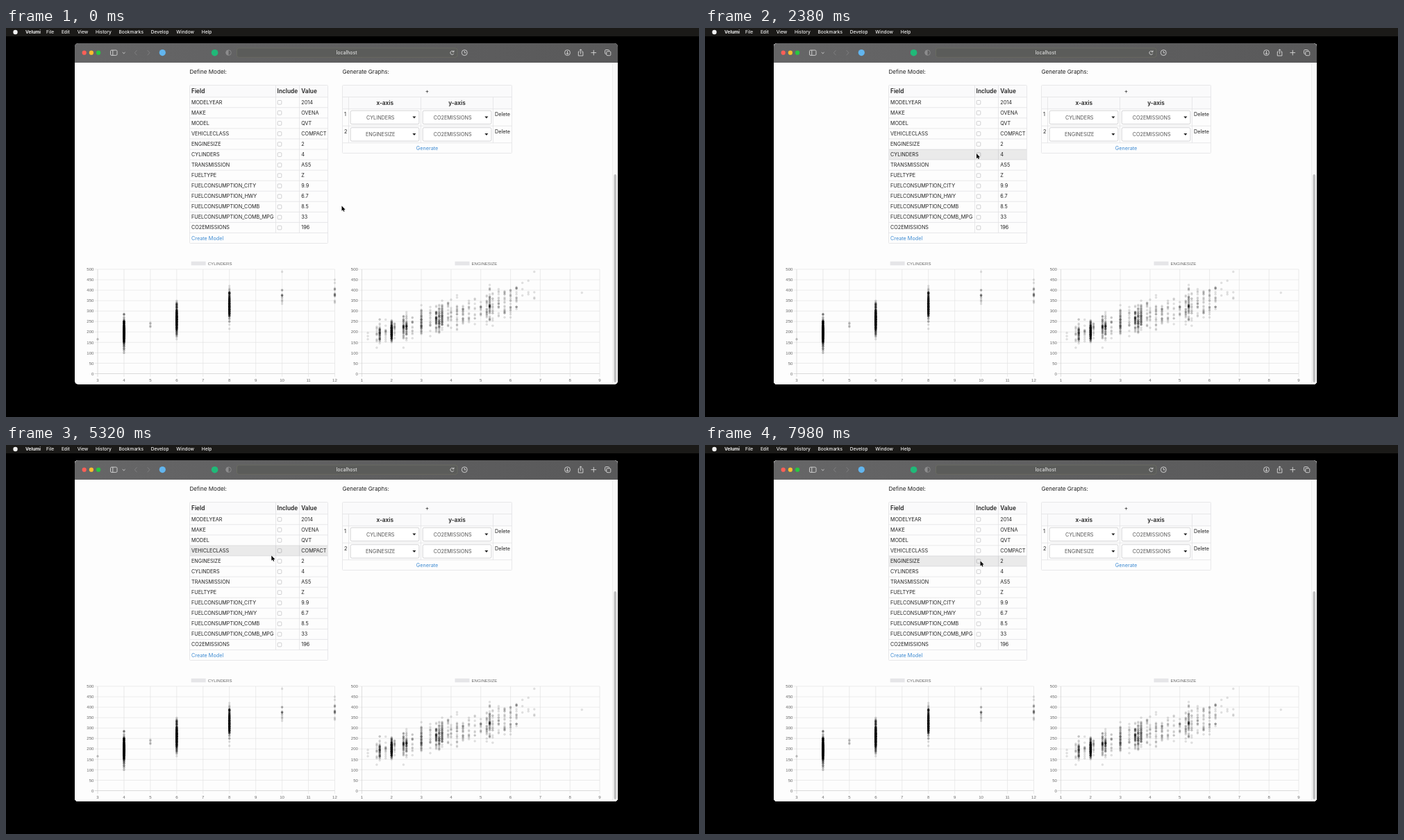
An HTML page with a canvas for the animation above (8000 ms loop, 998 px wide and 561 px high).

```html
<!DOCTYPE html>
<html lang="en">
<head>
<meta charset="utf-8">
<title>Model builder</title>
<style>
html, body { margin: 0; width: 100%; height: 100%; overflow: hidden; background: #000; }
canvas { display: block; }
</style>
</head>
<body>
<canvas id="stage" width="998" height="561"></canvas>
<script>
const LOOP = 8000;
const UI = 'Inter, sans-serif', CHART = '"Liberation Sans", Arial, sans-serif';
const LINE = '#e3e3e5', INK = '#222', BLUE = '#3c8ad2', ICON = '#d8d8d9', DIM = '#828283';
const ROW_TOP = 99.7, ROW_H = 15.06;

const stage = document.getElementById('stage');
const screen = stage.getContext('2d');
const base = document.createElement('canvas');
base.width = 998;
base.height = 561;
const g = base.getContext('2d');

function text(str, x, y, { size = 7.25, color = INK, weight = 400, align = 'left', font = UI } = {}) {
  g.font = `${weight} ${size}px ${font}`;
  g.fillStyle = color;
  g.textAlign = align;
  g.fillText(str, x, y + size * 0.36);
  return g.measureText(str).width;
}
function box(x, y, w, h, fill, stroke, r = 0) {
  g.beginPath();
  g.roundRect(x, y, w, h, r);
  if (fill) { g.fillStyle = fill; g.fill(); }
  if (stroke) { g.strokeStyle = stroke; g.stroke(); }
}
function circle(x, y, r, fill, stroke) {
  g.beginPath();
  g.arc(x, y, r, 0, 7);
  if (fill) { g.fillStyle = fill; g.fill(); }
  if (stroke) { g.strokeStyle = stroke; g.stroke(); }
}
function path(d, color, fill) {
  const p = new Path2D(d);
  if (fill) { g.fillStyle = color; g.fill(p); } else { g.strokeStyle = color; g.stroke(p); }
}
const hline = (x1, x2, y, color = LINE) => path(`M${x1} ${y}H${x2}`, color);
const vline = (x, y1, y2, color = LINE) => path(`M${x} ${y1}V${y2}`, color);

function drawMenuBar() {
  const style = { size: 6.6, color: '#f2f2f2', weight: 500 };
  box(0, 0, 998, 12, '#1b1a18');
  circle(13.5, 6, 3.2, '#f2f2f2');
  text('Velumi', 28, 6, { ...style, weight: 700 });
  let x = 58;
  for (const item of ['File', 'Edit', 'View', 'History', 'Bookmarks', 'Develop', 'Window', 'Help'])
    x += text(item, x, 6, style) + 10.8;
}

function drawWindow() {
  const bar = g.createLinearGradient(99, 0, 881, 0);
  bar.addColorStop(0, '#666667');
  bar.addColorStop(1, '#59595a');
  box(99, 22, 782, 492, '#fdfdfd', null, 5);
  box(99, 22, 782, 28, bar, null, [5, 5, 0, 0]);
  ['#fe5f57', '#febc2e', '#28c840'].forEach((c, i) => circle(112.7 + i * 10.2, 35.7, 3.1, c));
  g.lineWidth = 0.9;
  box(150.5, 32, 9.5, 7.4, null, ICON, 1.5);
  vline(153.8, 32, 39.4, ICON);
  path('M167.8 35l1.9 1.8l1.9-1.8', ICON);
  path('M188.5 32.2l-3.2 3.5l3.2 3.5M203.7 32.2l3.2 3.5l-3.2 3.5', DIM);
  circle(225.3, 35.6, 4.6, '#62b5ee');
  circle(300.6, 35.7, 4.8, '#20b978');
  circle(320.5, 35.6, 3.8, null, '#8c8c8d');
  path('M320.5 31.8a3.8 3.8 0 0 0 0 7.6z', '#8c8c8d', true);
  box(332.5, 29, 317.5, 13.3, '#5b5c5a', '#6a6b62', 3);
  text('localhost', 490.5, 35.8, { size: 7, color: '#f4f4f4', align: 'center' });
  path('M644.6 34.2a2.6 2.6 0 1 0 .3 2.6M645 32.4v2.2h-2.2', ICON);
  circle(660.3, 35.6, 4, null, ICON);
  path('M660.3 33v2.8h2.3', ICON);
  circle(808.5, 35.6, 4, null, ICON);
  path('M808.5 33v5M806.7 36.2l1.8 1.9l1.8-1.9', ICON);
  path('M826 34.2h-1.7v5.8h6.6v-5.8h-1.7M827.6 37.5v-6.6M825.8 32.5l1.8-1.8l1.8 1.8', ICON);
  path('M842.5 35.6h7.6M846.3 31.8v7.6', ICON);
  box(862.6, 31.5, 6, 6, null, ICON, 1.2);
  box(864.8, 33.7, 6, 6, bar, ICON, 1.2);
  box(873, 50, 8, 464, '#fafafa', null, [0, 0, 5, 0]);
  vline(873.5, 50, 513, '#ececec');
  box(875.4, 211, 3.8, 300, '#c1c1c2', null, 1.9);
}

function drawFieldTable() {
  const rows = [
    ['MODELYEAR', '2014'], ['MAKE', 'OVENA'], ['MODEL', 'QVT'], ['VEHICLECLASS', 'COMPACT'],
    ['ENGINESIZE', '2'], ['CYLINDERS', '4'], ['TRANSMISSION', 'AS5'], ['FUELTYPE', 'Z'],
    ['FUELCONSUMPTION_CITY', '9.9'], ['FUELCONSUMPTION_HWY', '6.7'], ['FUELCONSUMPTION_COMB', '8.5'],
    ['FUELCONSUMPTION_COMB_MPG', '33'], ['CO2EMISSIONS', '196']
  ];
  const head = { size: 8.3, weight: 600 };
  g.lineWidth = 0.8;
  text('Define Model:', 264.5, 63.4, { size: 8.1 });
  box(264.5, 82.5, 199, 228, '#fdfdfd', LINE, 1);
  box(265, 83, 198, 16.5, '#fafafb');
  text('Field', 267, 91.2, head);
  text('Include', 390.6, 91.2, head);
  text('Value', 425.3, 91.2, head);
  rows.forEach(([field, value], i) => {
    const y = ROW_TOP + i * ROW_H, mid = y + 7.4;
    hline(264.5, 463.5, y);
    text(field, 267, mid);
    text(value, 425.3, mid);
    box(391.2, mid - 2.6, 5.6, 5.6, '#fff', '#c2c2c4', 1);
  });
  const bottom = ROW_TOP + rows.length * ROW_H;
  hline(264.5, 463.5, bottom);
  vline(388.5, 82.5, bottom);
  vline(422.5, 82.5, bottom);
  text('Create Model', 267, 302.9, { color: BLUE });
}

function dropdown(label, x, y) {
  box(x, y, 98.7, 19.4, '#fff', '#cbcbcd', 2);
  text(label, x + 43, y + 9.7, { color: '#555', align: 'center' });
  path(`M${x + 89.2} ${y + 8.4}h5l-2.5 3z`, INK, true);
}

function drawGraphTable() {
  const head = { size: 8.3, weight: 600, align: 'center' };
  g.lineWidth = 0.8;
  text('Generate Graphs:', 484.4, 63.4, { size: 8.1 });
  box(484.5, 82.5, 244, 98, '#fdfdfd', LINE, 1);
  box(485, 83, 243, 33.5, '#fafafb');
  text('+', 606.5, 91.3, { size: 8.1, align: 'center' });
  text('x-axis', 545.7, 108.2, head);
  text('y-axis', 649.5, 108.2, head);
  for (const y of [99.5, 116.7, 141.2, 165.7]) hline(484.5, 728.5, y);
  for (const x of [493.5, 597.5, 701.5]) vline(x, 99.5, 165.7);
  ['CYLINDERS', 'ENGINESIZE'].forEach((name, i) => {
    const y = 119.2 + i * 24.5;
    text(i + 1, 487, y + 5.2);
    dropdown(name, 496.2, y);
    dropdown('CO2EMISSIONS', 600.2, y);
    text('Delete', 704, y + 5.2);
  });
  text('Generate', 606.5, 173, { color: BLUE, align: 'center' });
}

const yOf = v => 498.5 - v * 0.301;

// Draws grid and labels; returns the x scale.
function drawAxes(name, legendX, left, right, first, last) {
  const label = { size: 6.1, color: '#666', font: CHART };
  const xOf = n => left + (n - first) * (right - left) / (last - first);
  g.lineWidth = 0.6;
  box(legendX, 336.7, 21, 5.6, '#e5e5e8');
  text(name, legendX + 24, 339.6, label);
  for (let v = 0; v <= 500; v += 50) {
    hline(left - 4.5, right, yOf(v), v ? '#dfdfdf' : '#c4c4c4');
    text(v, left - 5.5, yOf(v), { ...label, align: 'right' });
  }
  for (let n = first; n <= last; n++) {
    vline(xOf(n), 348, 503, n === first ? '#c9c9c9' : '#dfdfdf');
    text(n, xOf(n), 508, { ...label, align: 'center' });
  }
  return xOf;
}

let seed = 11;
function random() {
  seed = (seed * 16807) % 2147483647;
  return seed / 2147483647;
}
const bell = () => (random() + random() + random() + random() - 2) * 1.7;

function dot(x, value) {
  g.lineWidth = 0.5;
  circle(x, yOf(value), 1.5, 'rgba(0,0,0,.11)', 'rgba(0,0,0,.09)');
}
function cloud(x, count, mean, spread) {
  for (let i = 0; i < count; i++) dot(x, Math.round((mean + bell() * spread) / 5) * 5);
}

function drawCharts() {
  let xOf = drawAxes('CYLINDERS', 266.7, 132, 473.5, 3, 12);
  for (const n of [3, 4, 5, 6, 8, 10, 12]) {
    const common = n % 2 === 0 && n < 10;
    cloud(xOf(n), common ? 600 - 45 * n : 2 * n - 4, Math.min(70 + 32 * n, 385), common ? 36 : 3 * n - 9);
  }
  dot(xOf(10), 488);

  xOf = drawAxes('ENGINESIZE', 646.5, 512.5, 855, 1, 9);
  const popular = [16, 20, 24, 25, 30, 35, 36, 37, 53];
  for (let tenths = 12; tenths <= 68; tenths++) {
    const litres = tenths / 10, mean = 130 + 37 * litres;
    const known = tenths < 40 ? tenths % 3 === 0 : tenths % 2 === 0;
    const scarce = tenths < 14 || tenths > 62;
    let count = 0;
    if (popular.includes(tenths)) count = tenths === 20 ? 185 : 55;
    else if (known) count = scarce ? 3 : 8 + random() * 14;
    cloud(xOf(litres), count, mean, 16 + 4.5 * litres);
    if (count > 3) dot(xOf(litres), mean + (random() - 0.5) * 200);
  }
  dot(xOf(6.8), 488);
  dot(xOf(8.4), 388);
}

drawMenuBar();
drawWindow();
drawFieldTable();
drawGraphTable();
drawCharts();

// Pointer key points: time, x, y
const track = [
  [0, 483.5, 256.5], [720, 483.5, 256.5], [1520, 472.5, 249], [1980, 412.5, 205.2],
  [2800, 368.5, 155.8], [3620, 376.8, 139], [4480, 376.8, 139], [6040, 387, 177],
  [6460, 386.5, 178.5], [6980, 396.5, 167.2], [LOOP, 396.5, 167.2]
];
function pointerAt(t) {
  const i = track.findIndex(key => key[0] > t);
  const [t0, x0, y0] = track[i - 1], [t1, x1, y1] = track[i];
  const k = (t - t0) / (t1 - t0);
  return [x0 + (x1 - x0) * k, y0 + (y1 - y0) * k];
}

const arrow = new Path2D('M0 0V7.3L1.7 5.8L2.8 8.3L4 7.8L3 5.4H5.2Z');

function draw(now) {
  const [x, y] = pointerAt(now % LOOP);
  screen.drawImage(base, 0, 0);
  const row = Math.floor((y - ROW_TOP) / ROW_H);
  if (x < 463.5 && row >= 0 && row < 13) {
    screen.fillStyle = 'rgba(0,0,0,.075)';
    screen.fillRect(265, ROW_TOP + row * ROW_H, 198, ROW_H);
  }
  screen.save();
  screen.translate(x, y);
  screen.lineWidth = 1;
  screen.strokeStyle = '#fff';
  screen.stroke(arrow);
  screen.fillStyle = '#000';
  screen.fill(arrow);
  screen.restore();
  requestAnimationFrame(draw);
}
requestAnimationFrame(draw);
</script>
</body>
</html>
```
